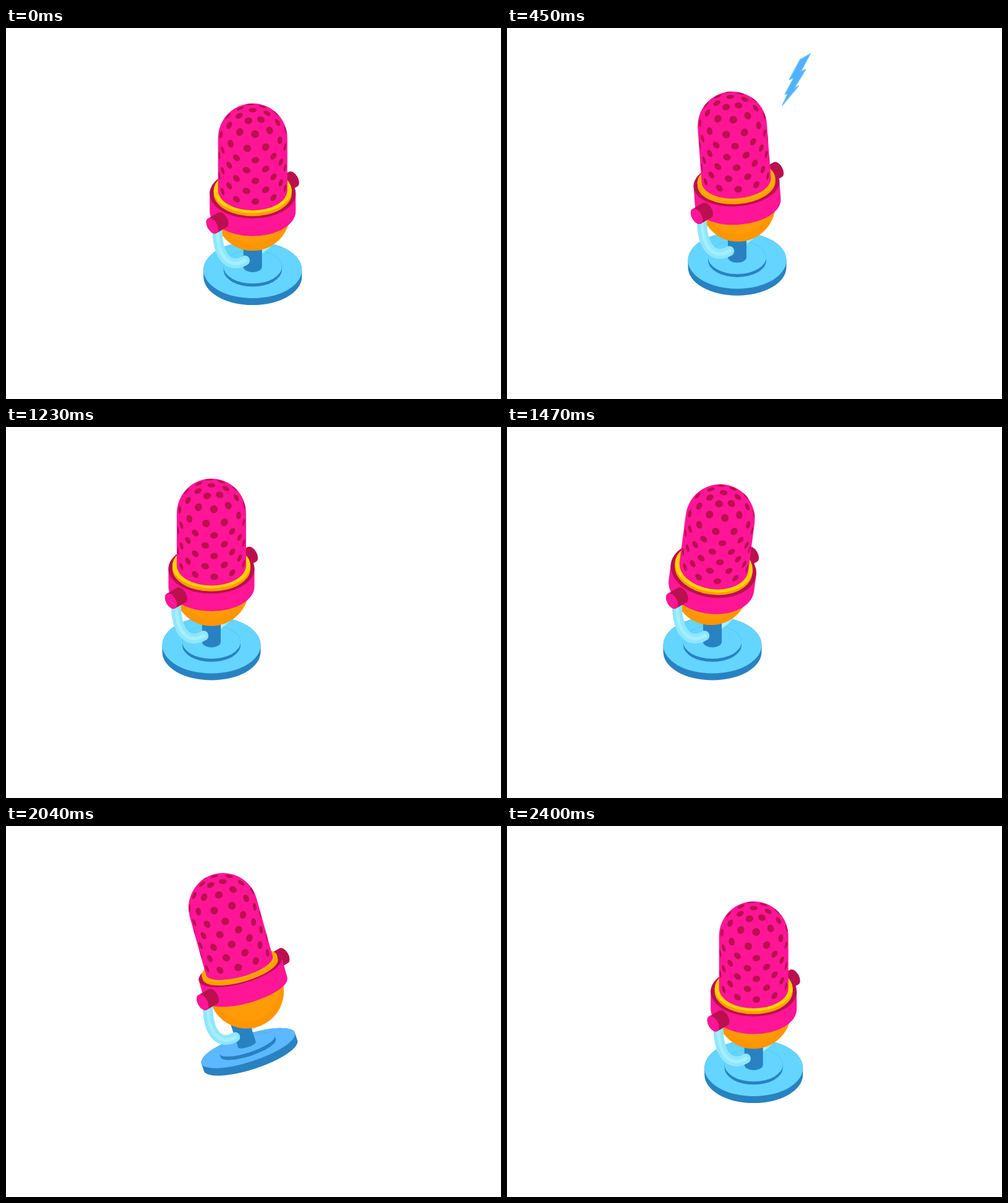
An HTML page for the animation above (2730 ms loop, 800 px wide and 600 px high).

```html
<!DOCTYPE html>
<html lang="en">
<head>
<meta charset="utf-8">
<title>Microphone</title>
<style>
  html, body { margin: 0; width: 100%; height: 100%; overflow: hidden; background: #fff; }
  svg { display: block; width: 100%; height: 100%; }
</style>
</head>
<body>
<svg id="stage" viewBox="0 0 800 600"></svg>
<script>
const LOOP = 2730, STEP = 30, RAD = Math.PI / 180;
const H = Math.SQRT1_2, FLAT = Math.sqrt(1 / 3), TALL = Math.sqrt(2 / 3);
const PINK = '#ff1596', WINE = '#ba104f', BLUE = '#63d5ff', DEEP = '#2882c1';
const stage = document.getElementById('stage');

const clamp = x => Math.max(0, Math.min(1, x));
const ease = x => (1 - Math.cos(Math.PI * clamp(x))) / 2;
const num = x => x.toFixed(2);
const xy = p => num(p[0]) + ' ' + num(p[1]);
const path = (d, fill, extra = '') => `<path d="${d}" fill="${fill}" ${extra}/>`;

function track(keys, t) {
  if (t <= keys[0][0]) return keys[0][1];
  for (let i = 1; i < keys.length; i++) {
    const [t0, a] = keys[i - 1], [t1, b] = keys[i];
    if (t <= t1) return a + (b - a) * ease((t - t0) / (t1 - t0));
  }
  return keys[keys.length - 1][1];
}

// Isometric frame at a screen origin, leaning back by deg about the pin axis.
function frame(origin, deg = 0) {
  const c = Math.cos(deg * RAD), s = Math.sin(deg * RAD);
  const vec = (a, b, z) => {
    const u = (a - b) * H, w = (a + b) * H;
    const w2 = w * c - z * s, z2 = z * c + w * s;
    const a2 = (w2 + u) * H, b2 = (w2 - u) * H;
    return [a2, b2 * FLAT - z2 * TALL, b2 * TALL + z2 * FLAT];
  };
  const at = (a, b, z) => {
    const p = vec(a, b, z);
    return [origin[0] + p[0], origin[1] + p[1]];
  };
  return { vec, at };
}

// Screen shape of a disc facing along n.
function tilt(n) {
  const len = Math.hypot(n[0], n[1]) || 1;
  const e = [-n[1] / len, n[0] / len];
  return { e, ratio: Math.sqrt(Math.max(0, 1 - len * len)), rot: Math.atan2(e[1], e[0]) / RAD };
}

function disc(p, n, r, fill) {
  const { ratio, rot } = tilt(n);
  return `<ellipse rx="${num(r)}" ry="${num(r * ratio)}" fill="${fill}" transform="translate(${xy(p)}) rotate(${num(rot)})"/>`;
}

function tube(f, axis, z0, z1, r, fill, dome = false) {
  const { e, ratio, rot } = tilt(f.vec(...axis));
  const at = z => f.at(...axis.map(k => k * z));
  const side = (p, k) => xy([p[0] + e[0] * r * k, p[1] + e[1] * r * k]);
  const p0 = at(z0), p1 = at(z1);
  const arc = ry => `A${r} ${num(ry)} ${num(rot)} 0 0 `;
  return path(`M${side(p0, -1)}${arc(r * ratio)}${side(p0, 1)}L${side(p1, 1)}` +
    `${arc(dome ? r : r * ratio)}${side(p1, -1)}Z`, fill);
}

const UP = [0, 0, 1];
const cyl = (f, z0, z1, r, fill) => tube(f, UP, z0, z1, r, fill);
const lid = (f, z, r, fill) => disc(f.at(0, 0, z), f.vec(...UP), r, fill);
const ball = (p, r, fill) => `<circle cx="${num(p[0])}" cy="${num(p[1])}" r="${r}" fill="${fill}"/>`;

const HEAD_R = 56, DOME_Z = 127.5, DOT_R = 6.3;

function makeDots() {
  const dots = [], reach = HEAD_R - 0.5;
  const row = (lat, z, count, start) => {
    for (let i = 0; i < count; i++) {
      const az = (start + i * 360 / count) * RAD;
      const c = Math.cos(lat * RAD), s = Math.sin(lat * RAD);
      const n = [Math.sin(az) * c, Math.cos(az) * c, s];
      dots.push({ n, p: [n[0] * reach, n[1] * reach, z + s * reach] });
    }
  };
  for (let i = 0; i < 5; i++) row(0, 41 + i * 20.5, 11, i % 2 ? -10.5 : 4.5);
  row(17.5, DOME_Z, 11, -9.5);
  row(42, DOME_Z, 10, 5.5);
  row(65, DOME_Z, 7, -17);
  row(90, DOME_Z, 1, 0);
  return dots;
}
const dots = makeDots();

function yoke(f, k, width, color, shine) {
  const pt = (s, z) => xy(f.at(s * k * H, -s * k * H, z));
  const d = `M${pt(-81, -10)}C${pt(-81, -70)} ${pt(-52, -106)} ${pt(-18, -106)}`;
  const line = (c, w) => path(d, 'none', `stroke="${c}" stroke-width="${w}" stroke-linecap="round"`);
  return line(color, width) + line(shine, width * 0.35);
}

function base(f, deg) {
  const top = deg > 8 ? '#5cb8ff' : BLUE;
  return cyl(f, -41, -27.5, 79.5, DEEP) + lid(f, -27.5, 79.5, top) +
    cyl(f, -27.5, -21.4, 47, DEEP) + lid(f, -21.4, 47, top);
}

function head(f, deg) {
  const bulb = f.at(0, 0, -21.5);
  let out = ball(bulb, 60.5, '#ff9500') + ball([bulb[0], bulb[1] - 4], 53, '#ff9b06');
  out += cyl(f, -17.5, 17.5, 69.5, PINK) + lid(f, 17.5, 69.5, WINE);
  out += cyl(f, 17.5, 23.5, 63, '#ff9d00') + lid(f, 23.5, 63, deg > 3 ? '#ffab00' : '#ffd200');
  out += tube(f, UP, 24, DOME_Z, HEAD_R, PINK, true);
  for (const { n, p } of dots) {
    const v = f.vec(...n);
    if (v[2] > 0.05) out += disc(f.at(...p), v, DOT_R, WINE);
  }
  return out;
}

const BOLT = [[81, -104], [108, -103], [71, -67], [84, -65], [42, -30], [54, -29],
  [0, 0], [22, -24], [16, -28], [50, -61], [39, -64]];
const WIDE = { m: [1, 0, 0, 1], fill: '#ff9500', edge: '#ffa01a' };
const SLIM = { m: [0.586, -0.35, 0.178, 0.44], fill: '#50b2fb', edge: '#68bfff' };
const bolts = [
  { kind: WIDE, start: 0, life: 300, tip: [448, 143], size: 1.2, speed: 0 },
  { kind: SLIM, start: 390, life: 270, tip: [445, 125], size: 1, speed: 0.55 },
  { kind: WIDE, start: 690, life: 180, tip: [449, 143], size: 1, speed: 0 }
];

function bolt({ kind, start, life, tip, size, speed }, t) {
  const p = (t - start) / life;
  if (p <= 0 || p >= 1) return '';
  const k = size * Math.min(1, 5 * p, 5 * (1 - p));
  const go = speed * (t - start - 60);
  const [a, b, c, d] = kind.m;
  const pts = BOLT.map(([x, y]) => xy([
    tip[0] + go * 0.48 + k * (a * x + c * y),
    tip[1] - go * 0.88 + k * (b * x + d * y)
  ]));
  return path('M' + pts.join('L') + 'Z', kind.fill,
    `stroke="${kind.edge}" stroke-width="1.5" stroke-linejoin="round"`);
}

const BEAT = 180, HOP = [1875, 2090];
const LEAN = [[1230, 0], [1770, -19.5], [1785, -19.5], [2040, 21], [2190, -8], [2310, 2.5], [2400, 0]];
const KICK = [[1875, 0], [2010, 27], [2040, 25], [2110, 0]];

function pose(t) {
  if (t < 900) {
    const f = t % BEAT / BEAT;
    return {
      slide: (Math.floor(t / BEAT) + ease((f - 0.67) / 0.33)) / 5,
      lift: 0, kick: 0,
      lean: 5.3 * Math.sin(Math.PI * clamp((f - 1 / 6) * 1.2))
    };
  }
  const p = clamp((t - HOP[0]) / (HOP[1] - HOP[0]));
  return { slide: 1 - p, lift: 144 * p * (1 - p), kick: track(KICK, t), lean: track(LEAN, t) };
}

const PIN_R = 13.7, PIN_END = 92.5;

function draw(t) {
  const { slide, lift, lean, kick } = pose(t);
  const pivot = [398.7 - 66.7 * slide, 282.2 - 38.5 * slide - lift];
  const still = frame(pivot), body = frame(pivot, lean);
  const foot = frame(still.at(0, 0, -106), kick);
  const left = [-H, H, 0], right = [H, -H, 0];
  stage.innerHTML = [
    base(foot, kick),
    yoke(still, -1, 8, '#a5ebff', '#b8f1ff'),
    cyl(foot, -21.4, 45, 15, DEEP),
    tube(still, right, 60, PIN_END, PIN_R, WINE),
    head(body, lean),
    yoke(still, 1, 16, '#8fe6fd', '#a4effd'),
    tube(still, left, 69, PIN_END, PIN_R, WINE),
    disc(still.at(...left.map(k => k * PIN_END)), still.vec(...left), PIN_R, PINK),
    ...bolts.map(b => bolt(b, t))
  ].join('');
}

let start = null, last = -1;
function tick(now) {
  if (start === null) start = now;
  const t = Math.floor((now - start) % LOOP / STEP) * STEP;
  if (t !== last) draw(last = t);
  requestAnimationFrame(tick);
}
draw(0);
requestAnimationFrame(tick);
</script>
</body>
</html>
```
